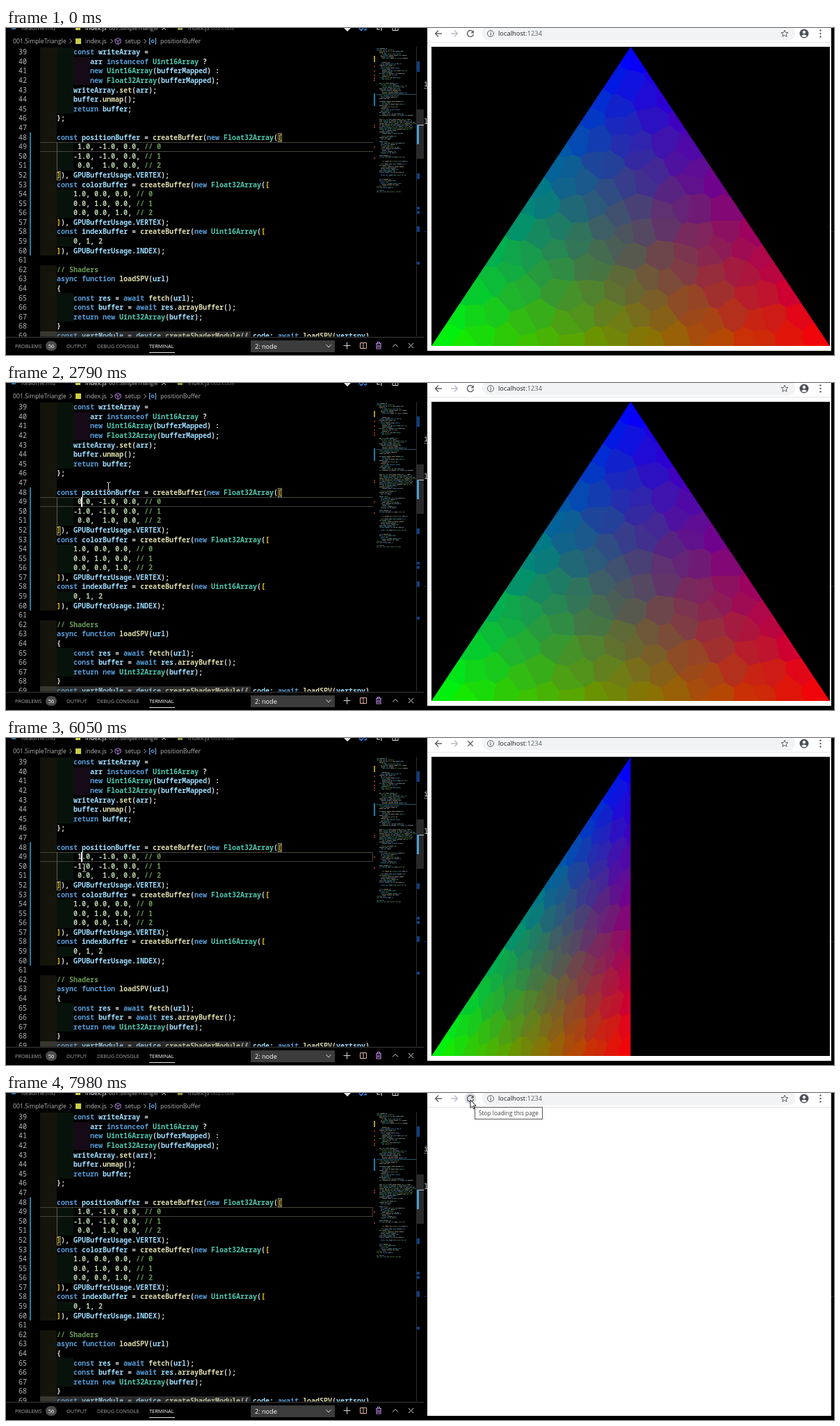
These frames come from a looping animation (1191x470 px, 8000 ms). An HTML page with a canvas:

```html
<!DOCTYPE html>
<html lang="en">
<head>
<meta charset="utf-8">
<title>Triangle editor</title>
<style>
html, body { margin: 0; width: 100%; height: 100%; overflow: hidden; background: #000; }
canvas { display: block; }
</style>
</head>
<body>
<canvas id="stage" width="1191" height="470"></canvas>
<script>
const W = 1191, H = 470, LOOP = 8000;
const UI = '"Open Sans", sans-serif';
const MONO = '10px "Noto Sans Mono", monospace';
const CHAR = 6, ROW = 13.6, TEXT_X = 49, FIRST_LINE = 39, FIRST_Y = 34.7;

const INDENT_ONLY = ' '.repeat(4);
const CODE = `        const writeArray =
            arr instanceof Uint16Array ?
            new Uint16Array(bufferMapped) :
            new Float32Array(bufferMapped);
        writeArray.set(arr);
        buffer.unmap();
        return buffer;
    };
${INDENT_ONLY}
    const positionBuffer = createBuffer(new Float32Array([

        -1.0, -1.0, 0.0, // 1
         0.0,  1.0, 0.0, // 2
    ]), GPUBufferUsage.VERTEX);
    const colorBuffer = createBuffer(new Float32Array([
        1.0, 0.0, 0.0, // 0
        0.0, 1.0, 0.0, // 1
        0.0, 0.0, 1.0, // 2
    ]), GPUBufferUsage.VERTEX);
    const indexBuffer = createBuffer(new Uint16Array([
        0, 1, 2
    ]), GPUBufferUsage.INDEX);

    // Shaders
    async function loadSPV(url)
    {
        const res = await fetch(url);
        const buffer = await res.arrayBuffer();
        return new Uint32Array(buffer);
    }
    const vertModule = device.createShaderModule({ code: await loadSPV(vertspv)`.split('\n');

const RULES = [
  [/^\/\/.*/, '#6a9955'],
  [/^(const|new|instanceof|async|function|return|await)\b/, '#569cd6'],
  [/^(Uint|Float)\d+Array/, '#4ec9b0'],
  [/^[a-z]\w*(?=\()/i, '#dcdcaa'],
  [/^[a-z]\w*/i, '#9cdcfe'],
  [/^\d+(\.\d+)?/, '#b5cea8'],
  [/^[\[\]]/, '#ffd21e'],
  [/^[^\w\s]/, '#e0e0e0']
];
const INDENT = ['#15140a', '#07130a', '#150a15'];

const stage = document.getElementById('stage').getContext('2d');
let g = stage;

function layer(w, h) {
  const c = document.createElement('canvas');
  c.width = w;
  c.height = h;
  return c.getContext('2d');
}

function rect(x, y, w, h, color) {
  g.fillStyle = color;
  g.fillRect(x, y, w, h);
}

function text(str, x, y, size, color, align = 'left') {
  g.font = `${size}px ${UI}`;
  g.textAlign = align;
  g.fillStyle = color;
  g.fillText(str, x, y);
  g.textAlign = 'left';
}

// Strokes an SVG-style path moved to x, y.
function stroke(d, x, y, color, width = 1) {
  g.save();
  g.translate(x, y);
  g.strokeStyle = color;
  g.lineWidth = width;
  g.stroke(new Path2D(d));
  g.restore();
}

function fillPath(d, x, y, color) {
  g.save();
  g.translate(x, y);
  g.fillStyle = color;
  g.fill(new Path2D(d));
  g.restore();
}

function disc(x, y, r, color) {
  g.fillStyle = color;
  g.beginPath();
  g.arc(x, y, r, 0, 7);
  g.fill();
}

function ring(x, y, r, color, width = 1) {
  g.strokeStyle = color;
  g.lineWidth = width;
  g.beginPath();
  g.arc(x, y, r, 0, 7);
  g.stroke();
}

function random(seed) {
  let s = seed;
  return () => (s = (s * 16807) % 2147483647) / 2147483647;
}

const rowY = line => FIRST_Y + (line - FIRST_LINE) * ROW;

function codeLine(src, line) {
  const y = rowY(line);
  const lead = src.match(/^ */)[0].length;
  const top = Math.round(y - ROW / 2), bottom = Math.round(y + ROW / 2);
  for (let c = 0; c + 4 <= lead; c += 4) {
    rect(TEXT_X + c * CHAR, top, 4 * CHAR, bottom - top, INDENT[c / 4]);
  }
  g.font = `600 ${MONO}`;
  for (let i = lead; i < src.length;) {
    const rest = src.slice(i);
    const rule = RULES.find(r => r[0].test(rest));
    if (!rule) { i++; continue; }
    const word = rest.match(rule[0])[0];
    g.fillStyle = rule[1];
    g.fillText(word, TEXT_X + i * CHAR, Math.round(y + 3.4));
    i += word.length;
  }
}

function bracketBox(col, line) {
  g.strokeStyle = '#8a8a70';
  g.lineWidth = 1;
  g.strokeRect(Math.round(TEXT_X + col * CHAR) + 0.5, Math.round(rowY(line) - 6) + 0.5, 5, 12);
}

function drawMinimap() {
  const next = random(77);
  const colors = ['#569cd6', '#9cdcfe', '#d4d4d4', '#dcdcaa', '#6a9955', '#4ec9b0'];
  g.globalAlpha = 0.55;
  for (let y = 27; y < 236; y += 2) {
    if (next() < 0.12) continue;
    const wide = y > 123 && y < 146;
    const outer = y < 33 || y > 226;
    const depth = wide || outer ? 0 : Math.floor(next() * 3) * 2;
    const start = 533 + (outer ? 0 : 4) + depth;
    const end = Math.min(591, start + (wide ? 46 + next() * 10 : 10 + next() * 28));
    for (let x = start; x < end;) {
      const w = 2 + next() * 6;
      rect(x, y, Math.min(w, end - x), 1, colors[Math.floor(next() * colors.length)]);
      x += w + 1;
    }
  }
  g.globalAlpha = 1;
  rect(533, 95, 58, 1, '#28566c');
  rect(529, 40, 2, 9, '#a89a2c');
  rect(529, 94, 2, 18, '#1b81a8');
  for (const y of [54, 61, 67, 71, 74, 139, 142, 170, 186]) rect(529, y, 2, 2, '#8c2f28');
}

function drawRuler() {
  rect(590, 27, 1, 416, '#2c2c2c');
  rect(591, 117, 10, 71, '#29292c');
  for (const [y, h] of [[48, 15], [209, 8], [257, 4], [263, 4], [285, 8], [336, 4]]) {
    rect(591, y, 4, h, '#0d3f86');
  }
  rect(591, 139, 3, 28, '#4b9fd0');
  rect(594, 139, 7, 1, '#c8c8c8');
  g.font = '11px "Noto Sans Mono", monospace';
  g.fillStyle = '#d0d0d0';
  g.fillText('i', 601, 84);
  g.fillText('l', 601, 138);
  rect(601, 86, 6, 1, '#777');
  rect(601, 292, 6, 1, '#14204a');
}

function drawTabs() {
  text('Readme.md', 22, 3, 8.7, '#8c8c8c');
  text('index.js', 114, 3, 8.7, '#fff');
  text('001.SimpleTriangle', 148, 3, 8, '#b5b5b5');
  text('index.js', 262, 3, 8.7, '#8c8c8c');
  text('002.cube', 295, 3, 8, '#666');
  rect(8, 0, 6, 2, '#2f6f9f');
  rect(100, 0, 7, 3, '#cbcb41');
  rect(247, 0, 7, 3, '#8c8c33');
  fillPath('M-5 0L0 5L5 0Z', 491, 0, '#e8e8e8');
  stroke('M-5 0L-2 3L1 0M2 2H5V0', 513, 0.5, '#3794ff', 1.4);
  stroke('M-3 0V2H1M3 0V4', 537, 0, '#ddd', 1.2);
  stroke('M-4 -2V3H4V-2M0 -2V3', 560, 0.5, '#ddd', 1);
}

function drawBreadcrumb() {
  const gray = '#b4b4b4';
  text('001.SimpleTriangle', 10, 22, 8.7, gray);
  text('index.js', 114, 22, 8.7, gray);
  text('setup', 171, 22, 8.7, gray);
  text('positionBuffer', 222, 22, 8.7, gray);
  for (const x of [93, 152, 200]) stroke('M-1.5 -3L1.5 0L-1.5 3', x, 19, gray);
  rect(100, 15, 8, 8, '#cbcb41');
  stroke('M0 -4.5L4 -2.5V2L0 4.5L-4 2V-2.5ZM-4 -2.5L0 -.5L4 -2.5M0 -.5V4.5', 161, 19, '#b180d7');
  stroke('M-3 -4H-4.5V4H-3M3 -4H4.5V4H3M-2 -1L0 -2L2 -1V1L0 2L-2 1Z', 211, 19, '#75beff');
}

function drawPanel() {
  rect(0, 443.5, 601, 27, '#000');
  rect(0, 444, 601, 1, '#3a3a3a');
  text('PROBLEMS', 13, 460, 7.4, '#a8a8a8');
  g.fillStyle = '#4d4d4d';
  g.beginPath();
  g.roundRect(57, 450, 16, 14, 7);
  g.fill();
  text('56', 65, 460, 7.6, '#fff', 'center');
  text('OUTPUT', 87, 460, 7.4, '#a8a8a8');
  text('DEBUG CONSOLE', 131, 460, 7.4, '#a8a8a8');
  text('TERMINAL', 206, 460, 7.4, '#fff');
  rect(206, 466, 37, 1, '#e7e7e7');
  rect(352, 449, 121, 17, '#3c3c3c');
  text('2: node', 358, 460.5, 9.1, '#fff');
  const light = '#d6d6d6';
  stroke('M-3.5 -2L0 2L3.5 -2', 464, 457, light);
  stroke('M-5 0H5M0 -5V5', 490.5, 456.5, light);
  stroke('M-4.5 -4H4.5V4H-4.5ZM0 -4V4', 514, 456.5, '#e0b3a0');
  stroke('M-4 -3H4M-1.5 -3V-5H1.5V-3M-3 -3V4.5H3V-3M-1 -1V3M1 -1V3', 536, 456.5, '#b180d7', 1.2);
  stroke('M-4 2L0 -2L4 2', 560, 456.5, light);
  stroke('M-3.5 -3.5L3.5 3.5M3.5 -3.5L-3.5 3.5', 582.5, 456.5, light);
}

function drawBrowser() {
  rect(606, 0, 581, 464, '#fff');
  g.fillStyle = '#f1f3f4';
  g.beginPath();
  g.roundRect(685, -4, 450, 22, 11);
  g.fill();
  rect(606, 20, 581, 1, '#e3e5e8');
  stroke('M5 0H-4.5M0 -4.5L-4.5 0L0 4.5', 622, 8, '#5f6368', 1.4);
  stroke('M-5 0H4.5M0 -4.5L4.5 0L0 4.5', 645, 8, '#b9bcc6', 1.4);
  ring(697, 8, 4.5, '#5f6368');
  rect(696.5, 7.3, 1.2, 3.5, '#5f6368');
  rect(696.5, 5.2, 1.2, 1.2, '#5f6368');
  text('localhost', 708, 11.3, 9.35, '#202124');
  const host = g.measureText('localhost').width;
  text(':1234', 708 + host, 11.3, 9.35, '#5f6368');
  stroke('M0 -5L1.4 -1.6L5 -1.4L2.2 .9L3.1 4.4L0 2.5L-3.1 4.4L-2.2 .9L-5 -1.4L-1.4 -1.6Z', 1120, 8, '#5f6368');
  disc(1148, 8, 6.5, '#4a4f58');
  disc(1148, 6, 2.2, '#fff');
  fillPath('M-4 3.5Q0 -.6 4 3.5Q0 6.5 -4 3.5Z', 1148, 8, '#fff');
  for (const y of [3.5, 8, 12.5]) disc(1171.5, y, 1.2, '#5f6368');
  rect(1187, 292, 4, 1, '#14204a');
}

function makeBackdrop() {
  g = layer(W, H);
  rect(0, 0, W, H, '#000');
  CODE.forEach((src, i) => {
    const line = FIRST_LINE + i;
    codeLine(src, line);
    g.font = `500 ${MONO}`;
    g.fillStyle = '#b8b8b8';
    g.fillText(line, 18, Math.round(rowY(line) + 3.4));
  });
  bracketBox(57, 48);
  bracketBox(4, 52);
  rect(34, 150, 2, 177, '#1b81a8');
  rect(49, 436, 303, 8, 'rgba(121,121,121,.36)');
  drawMinimap();
  drawRuler();
  drawTabs();
  drawBreadcrumb();
  drawPanel();
  drawBrowser();
  const done = g.canvas;
  g = stage;
  return done;
}

// Barycentric RGB gradient broken into flat, irregular cells.
const TW = 573, TH = 430, CELL = 31;
function makeGradient() {
  const next = random(4242);
  const cols = Math.ceil(TW / CELL) + 2, rows = Math.ceil(TH / CELL) + 2;
  const seeds = Array.from({ length: cols * rows }, (_, k) => {
    const j = Math.floor(k / cols), i = k % cols;
    const x = (i - 0.5 + (j % 2) * 0.4 + (next() - 0.5) * 0.75) * CELL;
    const y = (j - 0.5 + (next() - 0.5) * 0.75) * CELL;
    const blue = 1 - y / TH, red = x / TW - blue / 2;
    const mix = [red, 1 - blue - red, blue].map(v => Math.max(0, v));
    const sum = mix[0] + mix[1] + mix[2];
    return { x, y, rgb: mix.map(v => 255 * v / sum) };
  });
  const ctx = layer(TW, TH);
  const img = ctx.createImageData(TW, TH);
  for (let y = 0; y < TH; y++) {
    for (let x = 0; x < TW; x++) {
      const ci = Math.floor(x / CELL) + 1, cj = Math.floor(y / CELL) + 1;
      let best = Infinity, hit = null;
      for (let j = Math.max(0, cj - 1); j <= Math.min(rows - 1, cj + 1); j++) {
        for (let i = Math.max(0, ci - 2); i <= Math.min(cols - 1, ci + 1); i++) {
          const s = seeds[j * cols + i];
          const d = (s.x - x) ** 2 + (s.y - y) ** 2;
          if (d < best) { best = d; hit = s; }
        }
      }
      const p = (y * TW + x) * 4;
      for (let c = 0; c < 3; c++) img.data[p + c] = hit.rgb[c];
      img.data[p + 3] = 255;
    }
  }
  ctx.putImageData(img, 0, 0);
  return ctx.canvas;
}

const backdrop = makeBackdrop();
const gradient = makeGradient();

function drawTriangle(half) {
  rect(612, 27, TW, TH, '#000');
  g.save();
  g.translate(612, 27);
  if (half) g.transform(0.5, 0, -TW / 4 / TH, 1, TW / 4, 0);
  g.beginPath();
  g.moveTo(TW / 2, 0);
  g.lineTo(TW, TH);
  g.lineTo(0, TH);
  g.clip();
  g.drawImage(gradient, 0, 0);
  g.restore();
}

const within = (t, ...spans) => spans.some(([a, b]) => t >= a && t < b);

function drawActiveLine(t) {
  const erased = within(t, [1570, 1720], [3960, 4650]);
  const digit = erased ? '' : within(t, [1720, 3960]) ? '0' : '1';
  const edge = '#45433a';
  codeLine(`         ${digit}.0, -1.0, 0.0, // 0`, 49);
  rect(49, 164, 479, 1, edge);
  rect(49, 177, 479, 1, edge);
  if (t >= 3100) rect(527, 164, 1, 14, edge);
  rect(73, 164, 1, 41, '#5c5c5c');
  if (within(t, [900, 1400], [1570, 2270], [2720, 3270], [3730, 4420],
    [4650, 5200], [5690, 6130], [6680, 7180])) {
    rect(erased ? 102 : 108, 164, 2, 14, '#fff');
  }
}

function drawTabMark(t) {
  if (within(t, [1570, 2190], [3960, 5200])) disc(227, 0, 3.2, '#fff');
  else stroke('M-3 -3L3 3M3 -3L-3 3', 227, 0, '#d0d0d0');
}

function drawReload(t) {
  if (t >= 7750) disc(668, 8, 8.5, '#dfe1e5');
  if (within(t, [2500, 2790], [5520, 7830])) {
    stroke('M-3.7 -3.7L3.7 3.7M3.7 -3.7L-3.7 3.7', 668, 8, '#5f6368', 1.4);
  } else {
    stroke('M3.3 -3A4.5 4.5 0 1 0 4.4 1', 668, 8, '#5f6368', 1.4);
    fillPath('M4.8 -5V-.6H.4Z', 668, 8, '#5f6368');
  }
}

// Pointer keys: time, x, y.
const POINTER = [
  [70, 600, 374], [440, 64, 222], [610, 109, 170], [780, 112, 170], [1020, 118, 163],
  [2499, 118, 163], [2500, 147, 148], [5600, 147, 148], [5980, 112, 186], [6050, 112, 186],
  [6130, 111, 185], [6990, 111, 185], [7350, 420, 96], [7750, 668, 10], [8000, 668, 10]
];

function pointerAt(t) {
  const i = POINTER.findIndex(k => k[0] > t);
  if (i <= 0) return null;
  const [t0, x0, y0] = POINTER[i - 1], [t1, x1, y1] = POINTER[i];
  const step = Math.floor((t - t0) / 77) * 77;
  const p = Math.min(1, step / (t1 - t0));
  return [x0 + (x1 - x0) * p, y0 + (y1 - y0) * p];
}

// The I-beam stays hidden from 6450 until the hand moves again.
function drawPointer(t) {
  const at = pointerAt(t);
  if (!at || within(t, [6450, 6990])) return;
  const [x, y] = at.map(Math.round);
  if (x < 601) {
    stroke('M-2.5 -5.5H-.5M.5 -5.5H2.5M-2.5 5.5H-.5M.5 5.5H2.5M0 -5V5', x + 0.5, y + 0.5, '#e4e4e4');
  } else {
    const arrow = 'M0 0V11.5L2.7 9L4.6 13L6.3 12.2L4.5 8.4H8.2Z';
    fillPath(arrow, x, y, '#fff');
    stroke(arrow, x, y, '#000', 0.9);
  }
}

function drawTooltip() {
  rect(674, 20, 98, 18, '#fff');
  g.strokeStyle = '#575757';
  g.lineWidth = 1;
  g.strokeRect(674.5, 20.5, 97, 17);
  text('Stop loading this page', 680, 32, 8.35, '#444');
}

function render(t) {
  g.drawImage(backdrop, 0, 0);
  drawActiveLine(t);
  drawTabMark(t);
  if (t < 6130) drawTriangle(t >= 3100);
  drawReload(t);
  if (t >= 7980) drawTooltip();
  drawPointer(t);
}

const begin = performance.now();
function tick() {
  render((performance.now() - begin) % LOOP);
  requestAnimationFrame(tick);
}
tick();
</script>
</body>
</html>
```
